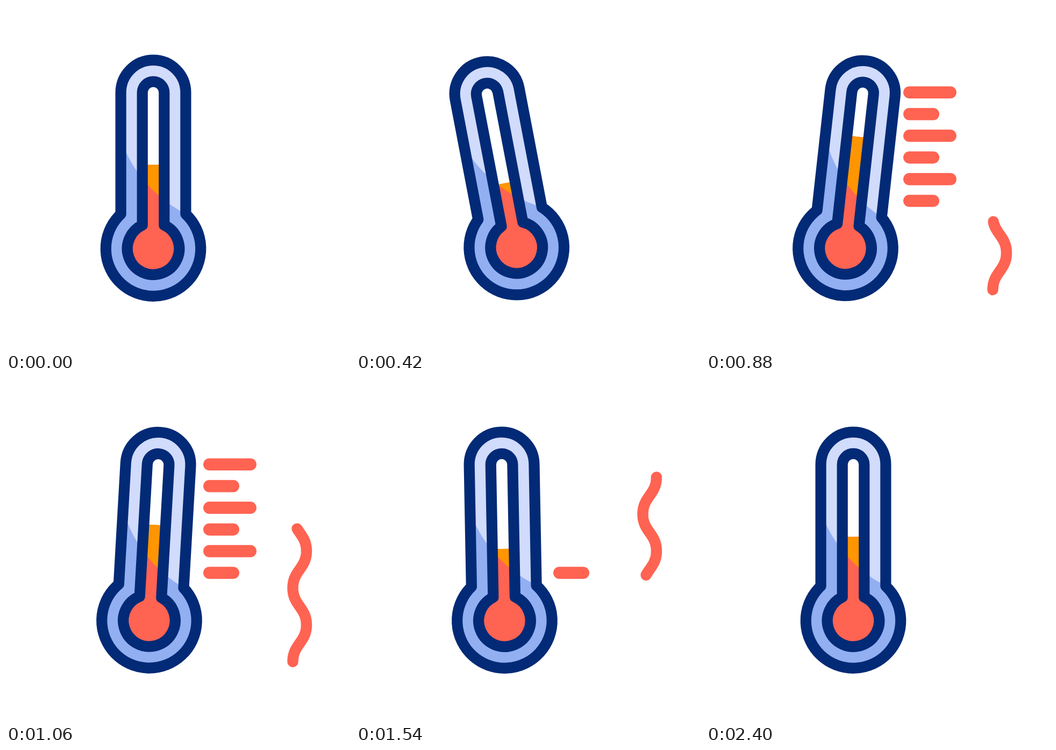
Write an HTML page with a canvas that moves like this. It is 640 px wide and 640 px high and loops after 2420 ms.

```html
<!DOCTYPE html>
<html lang="en">
<head>
<meta charset="utf-8">
<title>Thermometer</title>
<style>
html, body { margin: 0; width: 100%; height: 100%; overflow: hidden; background: #fff; }
canvas { display: block; width: 640px; height: 640px; }
</style>
</head>
<body>
<canvas id="stage" width="640" height="640"></canvas>
<script>
const ctx = document.getElementById('stage').getContext('2d');
const LOOP = 2420;
const NAVY = '#032a76', PALE = '#d1dbfb', BLUE = '#92aff2';
const RED = '#ff6352', ORANGE = '#ff9500';
const AXIS = 274, TOP = 161, BULB = 451.5;

// [time in ms, value]
const TILT = [[0, 0], [575, -13], [918, 6.9], [1282, -3.9], [1680, 0]];
const LEVEL = [[0, 295.5], [390, 331.5], [770, 236.5], [1400, 320], [2140, 295.5]];
const WAVE_HEAD = [[555, 0], [1339, 1]];
const WAVE_TAIL = [[1117, 0], [1999, 1]];

const ease = u => 0.5 - 0.5 * Math.cos(Math.PI * u);

function valueAt(keys, t) {
  if (t <= keys[0][0]) return keys[0][1];
  for (let i = 1; i < keys.length; i++) {
    const [t0, a] = keys[i - 1], [t1, b] = keys[i];
    if (t < t1) return a + (b - a) * ease((t - t0) / (t1 - t0));
  }
  return keys[keys.length - 1][1];
}

// Round-topped stem joined to a round bulb
function flask(stem, bulb) {
  const a = Math.acos(stem / bulb);
  const path = new Path2D();
  path.arc(AXIS, TOP, stem, Math.PI, 0);
  path.arc(AXIS, BULB, bulb, -a, Math.PI + a);
  path.closePath();
  return path;
}

const shell = flask(60.4, 88.3);
const tube = flask(20.3, 48.3);
const shine = new Path2D();
shine.arc(445, 168, 245, 0, 2 * Math.PI);

function fill(path, color) {
  ctx.fillStyle = color;
  ctx.fill(path);
}

function outline(path) {
  ctx.strokeStyle = NAVY;
  ctx.lineWidth = 20.2;
  ctx.stroke(path);
}

function drawThermometer(t) {
  const level = valueAt(LEVEL, t);
  ctx.save();
  ctx.translate(AXIS, 320);
  ctx.rotate(valueAt(TILT, t) * Math.PI / 180);
  ctx.translate(-AXIS, -320);

  ctx.save();
  ctx.clip(shell);
  fill(shell, BLUE);
  fill(shine, PALE);
  ctx.restore();
  outline(shell);

  fill(tube, '#fff');
  ctx.save();
  ctx.clip(tube);
  ctx.beginPath();
  ctx.rect(200, level, 150, 320);
  ctx.clip();
  fill(tube, RED);
  fill(shine, ORANGE);
  ctx.restore();
  outline(tube);
  ctx.restore();
}

// Marks appear from the bottom up and leave from the top down
function drawMarks(t) {
  ctx.strokeStyle = RED;
  ctx.lineWidth = 22.7;
  for (let i = 0; i < 6; i++) {
    if (t < 520 + 60 * i || t >= 1560 - 60 * i) continue;
    const y = 362.5 - 40.35 * i;
    ctx.beginPath();
    ctx.moveTo(378.4, y);
    ctx.lineTo(i % 2 ? 454.6 : 422.7, y);
    ctx.stroke();
  }
}

function drawWave(t) {
  const head = valueAt(WAVE_HEAD, t), tail = valueAt(WAVE_TAIL, t);
  if (t < 540 || tail >= 1) return;
  ctx.strokeStyle = RED;
  ctx.lineWidth = 20.5;
  ctx.beginPath();
  const steps = 120;
  for (let i = 0; i <= steps; i++) {
    const p = tail + (head - tail) * i / steps;
    const s = p * 5 * Math.PI - Math.PI / 2;
    ctx.lineTo(546.3 + 12.7 * Math.sin(s + 0.1 * Math.sin(2 * s)), 528 - 343.5 * p);
  }
  if (head - tail < 0.001) ctx.lineTo(533.6, 527.99);
  ctx.stroke();
}

function draw(t) {
  ctx.fillStyle = '#fff';
  ctx.fillRect(0, 0, 640, 640);
  ctx.lineCap = ctx.lineJoin = 'round';
  drawThermometer(t);
  drawMarks(t);
  drawWave(t);
}

const start = performance.now();
function frame() {
  draw((performance.now() - start) % LOOP);
  requestAnimationFrame(frame);
}
frame();
</script>
</body>
</html>
```
